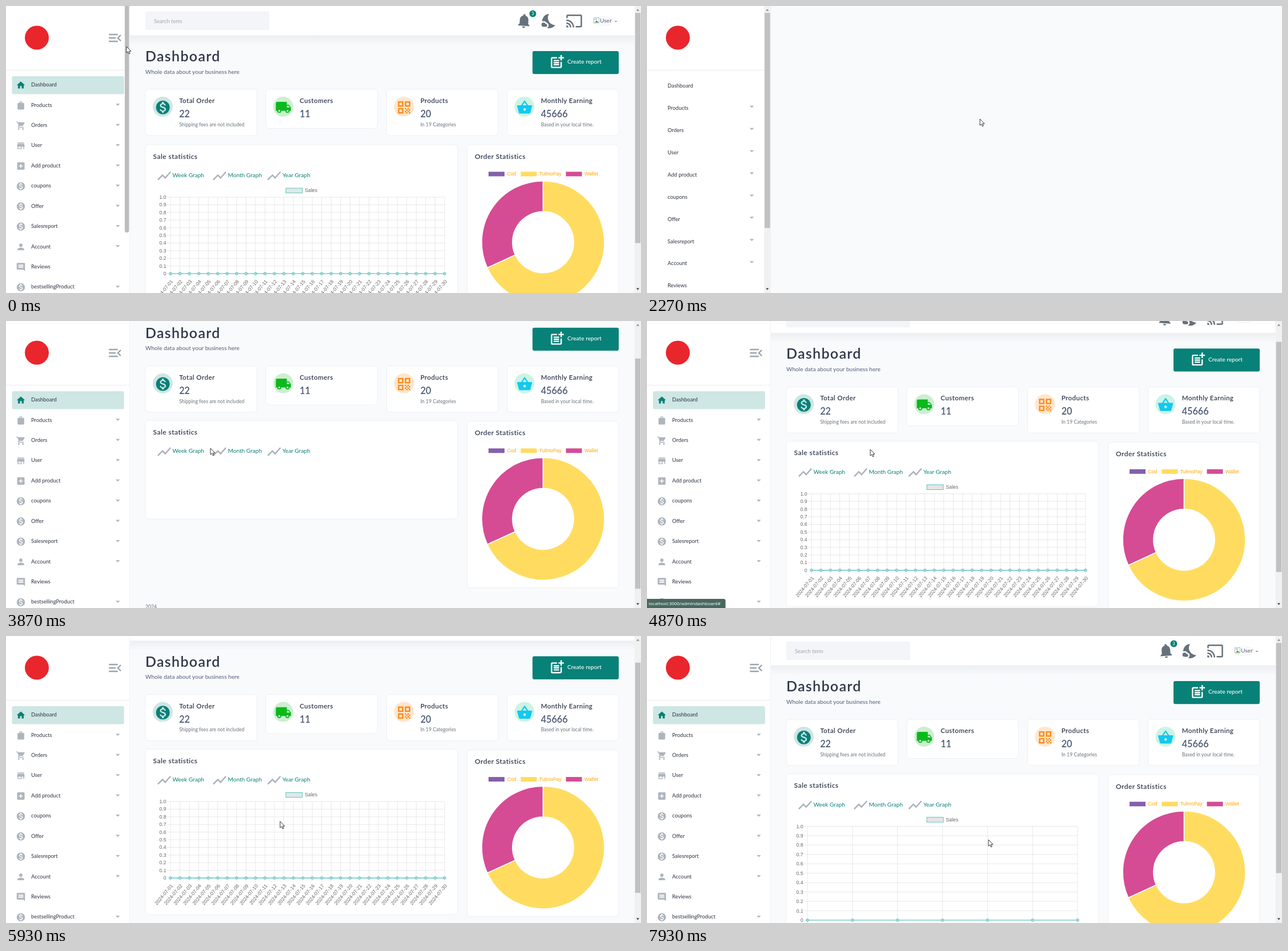
An HTML page for the animation above (8000 ms loop, 1112x503 px).

```html
<!DOCTYPE html>
<html lang="en">
<head>
<meta charset="utf-8">
<title>Dashboard</title>
<style>
html, body { margin: 0; width: 100%; height: 100%; overflow: hidden; background: #f9fafc; }
svg { display: block; width: 100vw; height: 100vh; font-family: Lato, sans-serif; }
text { white-space: pre; }
.nav { font-size: 9.41px; fill: #2d3442; }
.h1 { font-size: 25px; font-weight: 600; letter-spacing: 1.3px; fill: #2e374a; }
.h2 { font-size: 12px; font-weight: 600; letter-spacing: .45px; fill: #2e374a; }
.h3 { font-size: 11.6px; font-weight: 600; letter-spacing: .4px; fill: #2e374a; }
.num { font-size: 16.2px; font-weight: 600; fill: #4a5873; }
.body { font-size: 10.14px; fill: #4f5d77; }
.small { font-size: 8.69px; fill: #6c757d; }
.hint { font-size: 9.41px; fill: #a0a4aa; }
.link { font-size: 10.14px; fill: #088178; }
.btn { font-size: 10.14px; font-weight: 500; fill: #fff; }
.axis, .key { font: 8.69px "Liberation Sans", Arial, sans-serif; fill: #666; }
.key { fill: #ffa500; }
.status { font: 7.95px "Noto Sans", sans-serif; fill: #fff; }
.card { fill: #fff; stroke: #edeff2; }
</style>
</head>
<body>
<svg id="stage" viewBox="0 0 1112 503" preserveAspectRatio="none"></svg>
<script>
const LOOP = 8000, TEAL = '#088178', GREY = '#adb5bd', LINE = '#4bc0c0';
const ICON = {
  home: 'M10 20v-6h4v6h5v-8h3L12 3 2 12h3v8z',
  bag: 'M18 6h-2c0-2.21-1.79-4-4-4S8 3.79 8 6H6c-1.1 0-2 .9-2 2v12c0 1.1.9 2 2 2h12c1.1 0 2-.9 2-2V8c0-1.1-.9-2-2-2zm-6-2c1.1 0 2 .9 2 2h-4c0-1.1.9-2 2-2z',
  cart: 'M7 18a2 2 0 1 0 0 4 2 2 0 0 0 0-4zM1 2v2h2l3.6 7.59-1.35 2.45C4.5 15.4 5.5 17 7 17h12v-2H7.42c-.14 0-.25-.11-.25-.25l.93-1.75h7.45c.75 0 1.41-.41 1.75-1.03l3.58-6.49A1 1 0 0 0 20 4H5.21l-.94-2H1zm16 16a2 2 0 1 0 0 4 2 2 0 0 0 0-4z',
  store: 'M20 4H4v2h16V4zm1 10v-2l-1-5H4l-1 5v2h1v6h10v-6h4v6h2v-6h1zm-9 4H6v-4h6v4z',
  add: 'M19 3H5a2 2 0 0 0-2 2v14a2 2 0 0 0 2 2h14a2 2 0 0 0 2-2V5a2 2 0 0 0-2-2zm-2 10h-4v4h-2v-4H7v-2h4V7h2v4h4v2z',
  coin: 'M12 2a10 10 0 1 0 0 20 10 10 0 0 0 0-20zm1.41 16.09V20h-2.67v-1.93c-1.71-.36-3.16-1.46-3.27-3.4h1.96c.1 1.05.82 1.87 2.65 1.87 1.96 0 2.4-.98 2.4-1.59 0-.83-.44-1.61-2.67-2.14-2.48-.6-4.18-1.62-4.18-3.67 0-1.72 1.39-2.84 3.11-3.21V4h2.67v1.95c1.86.45 2.79 1.86 2.85 3.39H14.3c-.05-1.11-.64-1.87-2.22-1.87-1.5 0-2.4.68-2.4 1.64 0 .84.65 1.39 2.67 1.91s4.18 1.39 4.18 3.91c-.01 1.83-1.38 2.83-3.12 3.16z',
  person: 'M12 12a4 4 0 1 0 0-8 4 4 0 0 0 0 8zm0 2c-2.67 0-8 1.34-8 4v2h16v-2c0-2.66-5.33-4-8-4z',
  comment: 'M22 4a2 2 0 0 0-2-2H4a2 2 0 0 0-2 2v12c0 1.1.9 2 2 2h14l4 4V4zM18 14H6v-2h12v2zm0-3H6V9h12v2zm0-3H6V6h12v2z',
  bell: 'M12 22c1.1 0 2-.9 2-2h-4a2 2 0 0 0 2 2zm6-6v-5c0-3.07-1.64-5.64-4.5-6.32V4a1.5 1.5 0 0 0-3 0v.68C7.63 5.36 6 7.92 6 11v5l-2 2v1h16v-1l-2-2z',
  night: 'M11.1 12.08c-2.33-4.51-.5-8.48.53-10.07C6.27 2.2 1.98 6.59 2 12.42c.62-.27 1.29-.42 2-.42 1.66 0 3.18.83 4.1 2.15A4.01 4.01 0 0 1 11 18c0 1.52-.87 2.83-2.12 3.51.98.32 2.03.5 3.11.5 3.5 0 6.58-1.8 8.37-4.52-2.36.23-6.98-.97-9.26-5.41zM7 16h-.18C6.4 14.84 5.3 14 4 14a3 3 0 0 0 0 6h3a2 2 0 0 0 0-4z',
  cast: 'M21 3H3a2 2 0 0 0-2 2v3h2V5h18v14h-7v2h7a2 2 0 0 0 2-2V5a2 2 0 0 0-2-2zM1 18v3h3c0-1.66-1.34-3-3-3zm0-4v2c2.76 0 5 2.24 5 5h2c0-3.87-3.13-7-7-7zm0-4v2a9 9 0 0 1 9 9h2c0-6.08-4.93-11-11-11z',
  truck: 'M20 8h-3V4H3c-1.1 0-2 .9-2 2v11h2a3 3 0 0 0 6 0h6a3 3 0 0 0 6 0h2v-5l-3-4zM6 18.5a1.5 1.5 0 1 1 0-3 1.5 1.5 0 0 1 0 3zm13.5-9l1.96 2.5H17V9.5h2.5zm-1.5 9a1.5 1.5 0 1 1 0-3 1.5 1.5 0 0 1 0 3z',
  grid: 'M3 11h8V3H3v8zm2-6h4v4H5V5zM3 21h8v-8H3v8zm2-6h4v4H5v-4zM13 3v8h8V3h-8zm6 6h-4V5h4v4zM19 19h2v2h-2zM13 13h2v2h-2zM15 15h2v2h-2zM13 17h2v2h-2zM15 19h2v2h-2zM17 17h2v2h-2zM17 13h2v2h-2zM19 15h2v2h-2z',
  basket: 'M17.21 9l-4.38-6.56a1 1 0 0 0-1.66 0L6.79 9H2c-.55 0-1 .45-1 1l2.58 9.54c.23.84 1 1.46 1.92 1.46h13c.92 0 1.69-.62 1.93-1.46L23 10c0-.55-.45-1-1-1h-4.79zM9 9l3-4.4L15 9H9zm3 8a2 2 0 1 1 0-4 2 2 0 0 1 0 4z',
  menu: 'M3 18h13v-2H3v2zm0-5h10v-2H3v2zm0-7v2h13V6H3zm18 9.59L17.42 12 21 8.41 19.59 7l-5 5 5 5z',
  report: 'M17 19H5V7h7V5H5a2 2 0 0 0-2 2v12c0 1.1.9 2 2 2h12a2 2 0 0 0 2-2v-7h-2zM19 2h-2v3h-3v2h3v3h2V7h3V5h-3zM7 9h8v2H7zM7 12v2h8v-2zM7 15h8v2H7z',
  trend: 'M3.5 18.49l6-6.01 4 4L22 6.92l-1.41-1.41-7.09 7.97-4-4L2 16.99z'
};
const NAV = [['Dashboard', 'home'], ['Products', 'bag'], ['Orders', 'cart'], ['User', 'store'],
  ['Add product', 'add'], ['coupons', 'coin'], ['Offer', 'coin'], ['Salesreport', 'coin'],
  ['Account', 'person'], ['Reviews', 'comment'], ['bestsellingProduct', 'coin']];
const STATS = [
  [244, 'Total Order', '22', 'Shipping fees are not included', 'coin', TEAL, '#cfe6e3'],
  [455, 'Customers', '11', '', 'truck', '#0bb91c', '#ccefd0'],
  [666.5, 'Products', '20', 'In 19 Categories', 'grid', '#ff8a15', '#fee6cf'],
  [877.5, 'Monthly Earning', '45666', 'Based in your local time.', 'basket', '#12c9f0', '#cdf3e6']];
const LINKS = [['Week Graph', 265], ['Month Graph', 362], ['Year Graph', 457.5]];

// Markup helpers
const text = (x, y, cls, s, more = '') => `<text x="${x}" y="${y}" class="${cls}" ${more}>${s}</text>`;
const rect = (x, y, w, h, fill, more = '') => `<rect x="${x}" y="${y}" width="${w}" height="${h}" fill="${fill}" ${more}/>`;
const circle = (x, y, r, fill, more = '') => `<circle cx="${x}" cy="${y}" r="${r}" fill="${fill}" ${more}/>`;
const path = (d, fill, more = '') => `<path d="${d}" fill="${fill}" ${more}/>`;
const group = (id, body, more = '') => `<g id="${id}" ${more}>${body}</g>`;
const icon = (name, x, y, k, fill) =>
  path(ICON[name], fill, `transform="translate(${x - 12 * k} ${y - 12 * k}) scale(${k})" fill-rule="evenodd"`);
const caret = (x, y, w = 3.7, fill = GREY) => path(`M${x - w} ${y - w / 2}h${2 * w}l${-w} ${w}z`, fill);
const card = (x, y, w, h, more = '') => rect(x, y, w, h, '#fff', `rx="6" class="card" ${more}`);
const hasMenu = name => name !== 'Dashboard' && name !== 'Reviews';

function scrollbar(x, thumb, height) {
  return rect(x, 0, 12, 503, '#f1f1f1') + rect(x + 1, 12, 9.5, height, '#c1c1c1', `id="${thumb}"`) +
    path(`M${x + 3} 8.5h5.4l-2.7-3.2z`, '#8a8a8a') + path(`M${x + 3} 494.5h5.4l-2.7 3.2z`, '#444');
}

function sidebar() {
  const items = NAV.map(([name, ico], i) => {
    const y = 138 + 35.42 * i;
    return icon(ico, 26, y + .8, .724, i ? GREY : TEAL) + text(44, y + 3.2, 'nav', name) +
      (hasMenu(name) ? caret(195.8, y - .2) : '');
  }).join('');
  return rect(0, 0, 216.5, 503, '#fff') + rect(216.2, 0, .8, 503, '#eceef0') + rect(0, 112, 216.5, 1, '#ececec') +
    circle(54, 55.5, 21, '#e9262c') + icon('menu', 191, 56, 1.2, '#9ba4ad') +
    rect(10.5, 123, 196.3, 31.5, '#cee6e4', 'rx="3"') + items +
    rect(208, -5, 7.5, 402, '#bdbdbd', 'id="rail" rx="3.5"');
}

function blankPage() {
  const items = NAV.slice(0, 10).map(([name], i) => {
    const y = 140 + 38.9 * i;
    return text(36, y + 3.2, 'nav', name) + (hasMenu(name) ? caret(183.5, y - 2.2) : '');
  }).join('');
  return rect(0, 0, 1112, 503, '#f9fafc') + rect(0, 0, 205, 503, '#fff') + rect(0, 112, 205, 1, '#ececec') +
    circle(54, 55.5, 21, '#e9262c') + items + scrollbar(205, 'sideThumb', 377);
}

function header() {
  return rect(217, 51, 884, 18, 'url(#shade)') + rect(217, 0, 884, 51.5, '#fff') +
    rect(244, 9.5, 217, 32.5, '#f4f5f9', 'rx="3"') + text(259, 29.5, 'hint', 'Search term') +
    group('bell', icon('bell', 908, 26, 1.25, '#66717b')) + circle(922.5, 13.5, 6, TEAL) +
    text(922.5, 16.3, 'btn', '3', 'text-anchor="middle" style="font-size:7.5px"') +
    icon('night', 951.5, 26.5, 1.25, '#66717b') + icon('cast', 995, 26.3, 1.25, '#66717b') +
    '<ellipse cx="1045" cy="26.5" rx="17" ry="7.5" fill="none" stroke="#eee"/>' +
    rect(1029.5, 20.5, 9, 9.5, '#fff', 'stroke="#b4bac0"') + path('M1031 29l3-4 4 4z', '#4fa64f') +
    rect(1031, 22, 4, 2, '#9cc3ee') + text(1040, 29, 'body', 'User') + caret(1068, 27.3, 2.6, '#999');
}

function stat([x, title, num, note, ico, color, tint], i) {
  return group('card' + i, card(x, 146, 195.5, note ? 81 : 68.5) + circle(x + 30.5, 176.5, 17.5, tint) +
    icon(ico, x + 30.7, 177.7, 1.2, color) + text(x + 59.2, 170, 'h3', title) +
    text(x + 59.2, 195, 'num', num) + text(x + 59.2, 210.8, 'small', note));
}

function chart(id, x0, x1, step, count, label) {
  const bottom = 335 + 10 * step, dx = (x1 - x0) / (count - 1);
  let out = rect(490, 319.2, 29, 8.5, '#e5e5e5', `stroke="${LINE}" stroke-width=".9"`) + text(523.3, 326, 'axis', 'Sales');
  let grid = '', dots = '';
  for (let i = 0; i <= 10; i++) {
    const y = 335 + i * step;
    grid += `M${x0 - 6} ${y}H${x1}`;
    out += text(x0 - 7.5, y + 3, 'axis', i < 10 ? (1 - i / 10).toFixed(1) : '0', 'text-anchor="end"');
  }
  for (let i = 0; i < count; i++) {
    const x = x0 + i * dx;
    grid += `M${x} 335V${bottom + 6}`;
    dots += circle(x, bottom, 2.3, '#b9d6d6', `stroke="${LINE}" stroke-width=".9"`);
    out += label(x, bottom, i);
  }
  return group(id, out + path(grid, 'none', 'stroke="#e3e3e3" stroke-width=".8"') +
    path(`M${x0} ${bottom}H${x1}`, 'none', `stroke="${LINE}" stroke-width="1.2"`) + dots);
}
const day = n => '2024-07-' + String(n).padStart(2, '0');
const slanted = (x, y, i) => text(0, 0, 'axis', day(i + 1),
  `text-anchor="end" transform="translate(${x + 4.8} ${y + 14}) rotate(-50)"`);
const level = (x, y, i) => text(x, y + 15, 'axis', day(i + 24), 'text-anchor="middle"');

function saleCard() {
  return group('sale', card(244, 243, 547, 290, 'id="saleBox"') + text(257.5, 267.5, 'h2', 'Sale statistics') +
    LINKS.map(([name, x], i) => icon('trend', x + 12, 297.7, 1.2, '#abb2b9') +
      text(x + 26.4, 300, 'link', name, `id="link${i}"`)).join('') +
    chart('month', 288, 768, 13.4, 30, slanted) + chart('week', 281, 754, 16.45, 7, level));
}

function orderCard() {
  const key = (x, color, name) => rect(x, 290.5, 28, 8, color) + text(x + 32.4, 297.3, 'key', name);
  return card(807.5, 243, 265.5, 292) + text(821, 267.5, 'h2', 'Order Statistics') +
    key(845, '#8460ab', 'Cod') + key(901.5, '#ffdc60', 'TulmoPay') + key(980.5, '#d54c94', 'Wallet') +
    path('', '#ffdc60', 'id="arcA" stroke="#fff" stroke-width="1.6"') +
    path('', '#d54c94', 'id="arcB" stroke="#fff" stroke-width="1.6"');
}

const page = header() + text(244, 97, 'h1', 'Dashboard') + text(244, 118.5, 'body', 'Whole data about your business here') +
  rect(922, 79, 151, 40.3, TEAL, 'rx="3"') + icon('report', 965, 98, 1.2, '#fff') +
  text(983, 101.3, 'btn', 'Create report') + STATS.map(stat).join('') + saleCard() + orderCard() +
  text(244, 571, 'small', '2024');

document.getElementById('stage').innerHTML =
  `<defs><linearGradient id="shade" x2="0" y2="1"><stop stop-color="#eceef1"/><stop offset="1" stop-color="#f9fafc"/></linearGradient></defs>` +
  rect(0, 0, 1112, 503, '#f9fafc') +
  group('app', group('page', page) + scrollbar(1100.7, 'thumb', 403.5) + sidebar()) +
  group('blank', blankPage()) +
  group('status', path('M0 487h134q3.5 0 3.5 3.5V503H0z', '#48685f') + text(3, 498.3, 'status', 'localhost:3000/admindashboard#')) +
  group('cursor', path('M0 0V11.2L2.6 8.9 4.3 12.9 6.2 12.1 4.5 8.2H8z', '#fff', 'stroke="#222" stroke-width=".9"'));

// Motion tracks: [time, ...values], eased between neighbours
const POINTER = [[0, 211, 71], [300, 104, 85], [500, 108, 88], [900, 235, 110], [1200, 412, 122], [1400, 413, 122],
  [2200, 583, 198], [3000, 583, 198], [3350, 410, 130], [3870, 358, 223], [3930, 364, 223], [4270, 391, 225],
  [5500, 391, 225], [5930, 480, 325], [6270, 330, 267], [6400, 330, 267], [6670, 321, 245], [7350, 321, 245], [7930, 598, 357]];
const SCROLL = [[0, 0], [2780, 0], [3060, 67.2], [4670, 67.2], [5050, 0], [5530, 0], [5880, 43.4], [5950, 43.4],
  [6200, 41.2], [7200, 41.2], [7600, 0]];
const STATUS = [[0, 0], [4000, 0], [4150, 1], [5200, 1], [5340, 0], [6860, 0], [6925, 1], [7500, 1], [7640, 0]];
const RAIL = [[0, 1], [930, 1], [1200, 0]];

function at(track, t) {
  const i = track.findIndex(k => k[0] > t);
  if (i < 0) return track[track.length - 1].slice(1);
  const a = track[i - 1], b = track[i], p = (t - a[0]) / (b[0] - a[0]), e = p * p * (3 - 2 * p);
  return a.slice(1).map((v, j) => v + (b[j + 1] - v) * e);
}

function arc(from, to) {
  if (to - from < .1) return '';
  const outer = 107.4, inner = 53.6, big = to - from > 180 ? 1 : 0;
  const point = (r, deg) => {
    const a = (deg - 90) * Math.PI / 180;
    return `${(940.5 + r * Math.cos(a)).toFixed(2)} ${(414 + r * Math.sin(a)).toFixed(2)}`;
  };
  return `M${point(outer, from)}A${outer} ${outer} 0 ${big} 1 ${point(outer, to)}` +
    `L${point(inner, to)}A${inner} ${inner} 0 ${big} 0 ${point(inner, from)}Z`;
}

const nodes = {};
const set = (id, name, value) =>
  (nodes[id] = nodes[id] || document.getElementById(id)).setAttribute(name, value);
const show = (id, on) => set(id, 'display', on ? 'inline' : 'none');

function draw(t) {
  const [x, y] = at(POINTER, t), [scroll] = at(SCROLL, t), [status] = at(STATUS, t);
  const reloading = t >= 2260 && t < 2620;
  const chartKind = t < 2260 || (t >= 4800 && t < 7400) ? 'month' : t >= 7400 ? 'week' : '';
  const over = (left, top, w, h) => x >= left && x <= left + w && y + scroll >= top && y + scroll <= top + h;
  const lift = (id, on) => set(id, 'transform', `translate(0 ${on ? -1.5 : 0})`);

  show('app', !reloading);
  show('blank', reloading);
  show('month', chartKind === 'month');
  show('week', chartKind === 'week');
  set('page', 'transform', `translate(0 ${-scroll})`);
  set('thumb', 'y', 12 + scroll * .8);
  set('cursor', 'transform', `translate(${x} ${y})`);
  set('status', 'opacity', status);
  set('rail', 'opacity', at(RAIL, t)[0]);
  set('rail', 'x', t < 100 ? 208 : 211);
  set('rail', 'width', t < 100 ? 7.5 : 4.5);
  set('bell', 'transform', `rotate(${4 * Math.cos(t / 1220 * 2 * Math.PI)} 908 15)`);

  const boxHeight = chartKind ? 290 : 172.5;
  set('saleBox', 'height', boxHeight);
  lift('sale', over(244, 243, 547, boxHeight));
  STATS.forEach((s, i) => lift('card' + i, over(s[0], 146, 195.5, s[3] ? 81 : 68.5)));
  LINKS.forEach((l, i) => set('link' + i, 'style', over(l[1], 284, 86, 22) ? 'fill:#2255b0' : ''));

  const p = t < 2260 ? 1 : Math.min(1, Math.max(0, (t - 2870) / 1000));
  const grown = 360 * (1 - (1 - p) ** 4), split = grown * 15 / 22;
  set('arcA', 'd', arc(0, split));
  set('arcB', 'd', arc(split, grown));
}

const start = performance.now();
function tick() {
  draw((performance.now() - start) % LOOP);
  requestAnimationFrame(tick);
}
tick();
</script>
</body>
</html>
```
